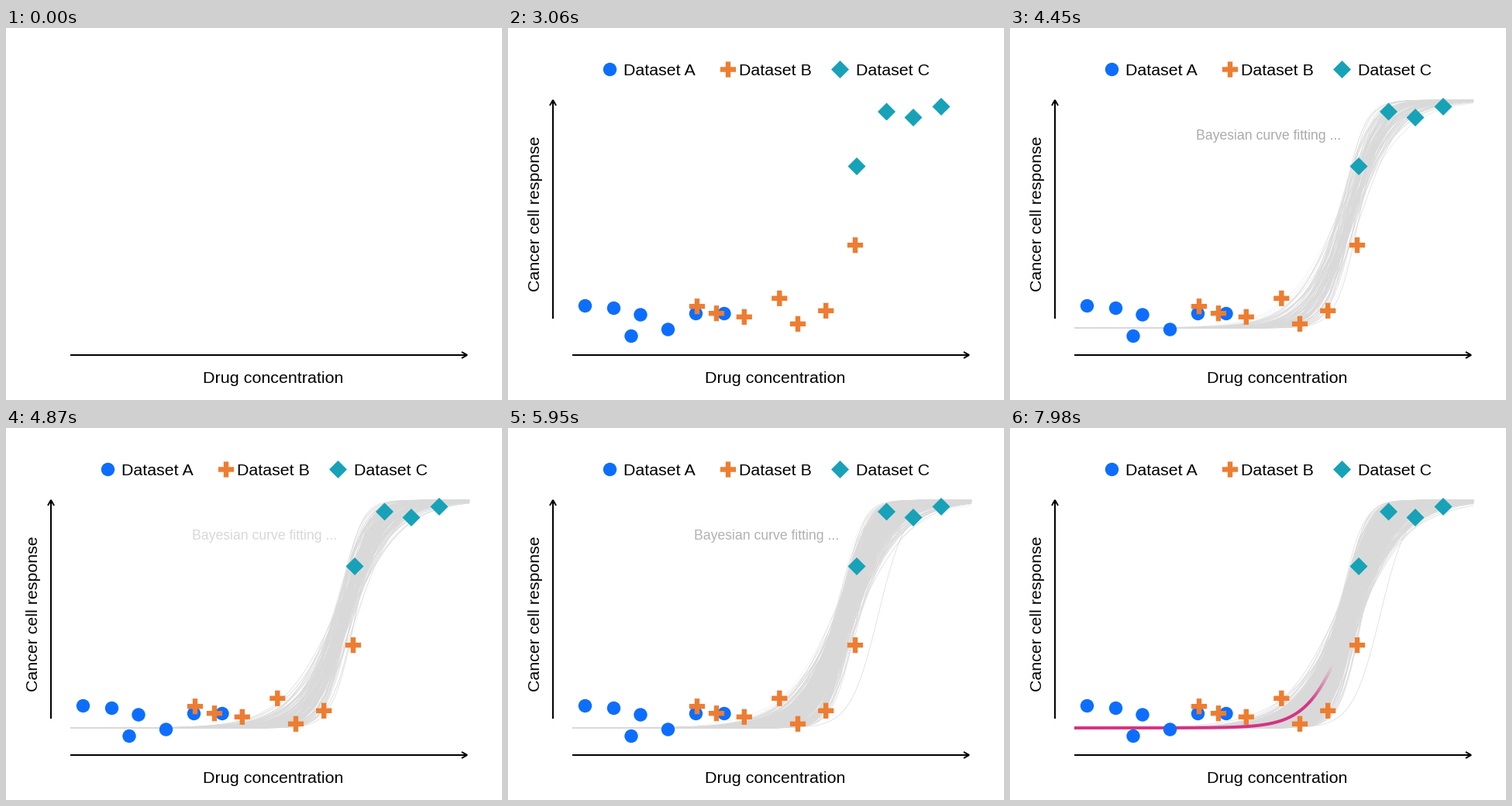
Write a matplotlib script that moves like this. It is 640 by 480 pixels and loops after 8000 ms.

```python
import numpy as np
import matplotlib.pyplot as plt
from matplotlib.animation import FuncAnimation
from matplotlib.collections import LineCollection, PatchCollection
from matplotlib.patches import Circle, Polygon

W, H, DPI = 640, 480, 100
LOOP, STEP = 8000, 20
PX = 72 / DPI  # points per pixel

BLUE, ORANGE, TEAL = "#0d6efd", "#ed7d31", "#17a2b8"
PINK, GREY, NOTE = "#d63384", "#d9d9d9", "#787878"

T_YAXIS, T_A, T_B, T_C = 1070, 2070, 2530, 3060
T_NOTE, T_FIT, T_FIT_END, T_MEAN = 3590, 3790, 7330, 7920
TICK, PULSE = 60, 504
BATCHES, PER_BATCH = 7, 54
X0, X1, Y_LOW, Y_HIGH = 83, 598, 387, 93

plt.rcParams["font.family"] = "Liberation Sans"
fig = plt.figure(figsize=(W / DPI, H / DPI), dpi=DPI, facecolor="white")
ax = fig.add_axes([0, 0, 1, 1])
ax.set(xlim=(0, W), ylim=(H, 0))
ax.axis("off")


def label(x, y, s, size=21.4, **kw):
    return ax.text(x, y, s, fontsize=size * PX, va="baseline",
                   rotation_mode="anchor", **kw)


def stroke(points, width=2, color="black", **kw):
    x, y = zip(*points)
    return ax.plot(x, y, color=color, lw=width * PX, solid_capstyle="butt",
                   solid_joinstyle="miter", **kw)[0]


def dot(x, y):
    return Circle((x, y), 8.7)


def plus(x, y, r=10.1, t=3.2):
    return Polygon([(x - t, y - r), (x + t, y - r), (x + t, y - t),
                    (x + r, y - t), (x + r, y + t), (x + t, y + t),
                    (x + t, y + r), (x - t, y + r), (x - t, y + t),
                    (x - r, y + t), (x - r, y - t), (x - t, y - t)])


def diamond(x, y, r=11.5):
    return Polygon([(x, y - r), (x + r, y), (x, y + r), (x - r, y)])


def dataset(name, x, marker, color, z, points):
    """Legend entry (first point) and data markers of one dataset."""
    marks = PatchCollection([marker(*p) for p in points], facecolor=color,
                            edgecolor="none", zorder=z, snap=False)
    ax.add_collection(marks)
    return [marks, label(x, 61, name)]


def sigmoid(x, mid, scale):
    return Y_LOW + (Y_HIGH - Y_LOW) / (1 + np.exp(-(x - mid) / scale))


# Axes
stroke([(83, 422), (595, 422)])
stroke([(588, 418), (595, 422), (588, 426)])
label(344.7, 458, "Drug concentration", size=21.5, ha="center")
y_axis = [
    stroke([(58, 375), (58, 93)]),
    stroke([(54, 100), (58, 93), (62, 100)]),
    label(41, 240, "Cancer cell response", ha="center", rotation=90),
]

# Data
set_a = dataset("Dataset A", 149, dot, BLUE, 5, [
    (131.5, 53.5), (99.5, 358.5), (136.5, 361.5), (171, 370), (159, 397.5),
    (206.5, 389), (242.5, 368.5), (279, 368.5)])
set_b = dataset("Dataset B", 298.5, plus, ORANGE, 6, [
    (284, 53.5), (244, 359.2), (269, 368.2), (304.8, 372.8), (350.3, 348.8),
    (374, 381.8), (410.2, 364.8), (448, 280.2)])
set_c = dataset("Dataset C", 449, diamond, TEAL, 7, [
    (428.5, 53.5), (450, 178.5), (488.5, 108), (523, 115.5), (559, 101.5)])
note = label(240, 144, "Bayesian curve fitting ...", size=17.6, color=NOTE)

# Sampled curves, added batch by batch
rng = np.random.default_rng(11)
xs = np.concatenate([[X0], np.linspace(200, X1, 76)])
outliers = {2: [(434, 37)], 3: [(478, 18)], 4: [(421, 36), (436, 44)]}
batches = []
for b in range(BATCHES):
    scale = np.clip(22 * np.exp(rng.normal(0, 0.27, PER_BATCH)), 12.5, 36)
    mid = 437 + np.clip(rng.normal(0, 8, PER_BATCH), -17, 18)
    params = list(zip(mid, scale)) + outliers.get(b, [])
    lines = [np.column_stack([xs, sigmoid(xs, m, s)]) for m, s in params]
    batch = LineCollection(lines, colors=GREY, linewidths=0.7 * PX, zorder=2)
    ax.add_collection(batch)
    batches.append(batch)

# Mean curve with a soft leading edge
SOFT, PARTS = 28, 14
mean_line = stroke([(X0, Y_LOW)], width=4, color=PINK, zorder=3)
mean_tip = LineCollection([], linewidths=4 * PX, capstyle="butt", zorder=3)
ax.add_collection(mean_tip)


def mean_curve(x):
    return sigmoid(x, 442, 27)


def draw_mean(edge):
    x = np.linspace(X0, edge - SOFT, 160)
    mean_line.set_data(x, mean_curve(x))
    x = np.linspace(edge - SOFT, edge, PARTS + 1)
    pts = np.column_stack([x, mean_curve(x)])
    mean_tip.set_segments(np.stack([pts[:-1], pts[1:]], axis=1))
    fade = 1 - (np.arange(PARTS) + 0.5) / PARTS
    mean_tip.set_color([(PINK, a) for a in fade])


def show(artists, on):
    for a in artists:
        a.set_visible(on)


def update(i):
    t = i * STEP + STEP / 2
    show(y_axis, t >= T_YAXIS)
    show(set_a, t >= T_A)
    show(set_b, t >= T_B)
    show(set_c, t >= T_C)

    # The fit advances in ticks; the note pulses once per batch
    beat = (t - T_FIT) // TICK * TICK / PULSE
    phase = beat % 1
    note.set_visible(T_NOTE <= t < T_FIT_END)
    note.set_alpha(1 if t < T_FIT else max(0.08, 1 - abs(2 * phase - 1)))
    for b, batch in enumerate(batches):
        batch.set_visible(t >= T_FIT and beat >= b)
        batch.set_alpha(np.clip((beat - b) / 0.9 + 0.05, 0, 1))

    show([mean_line, mean_tip], t >= T_MEAN)
    if t >= T_MEAN:
        draw_mean(250 if t < T_MEAN + TICK else 416)
    return []


anim = FuncAnimation(fig, update, frames=LOOP // STEP, interval=STEP,
                     init_func=lambda: update(0), repeat=True,
                     repeat_delay=0, blit=False)
plt.show()
```
